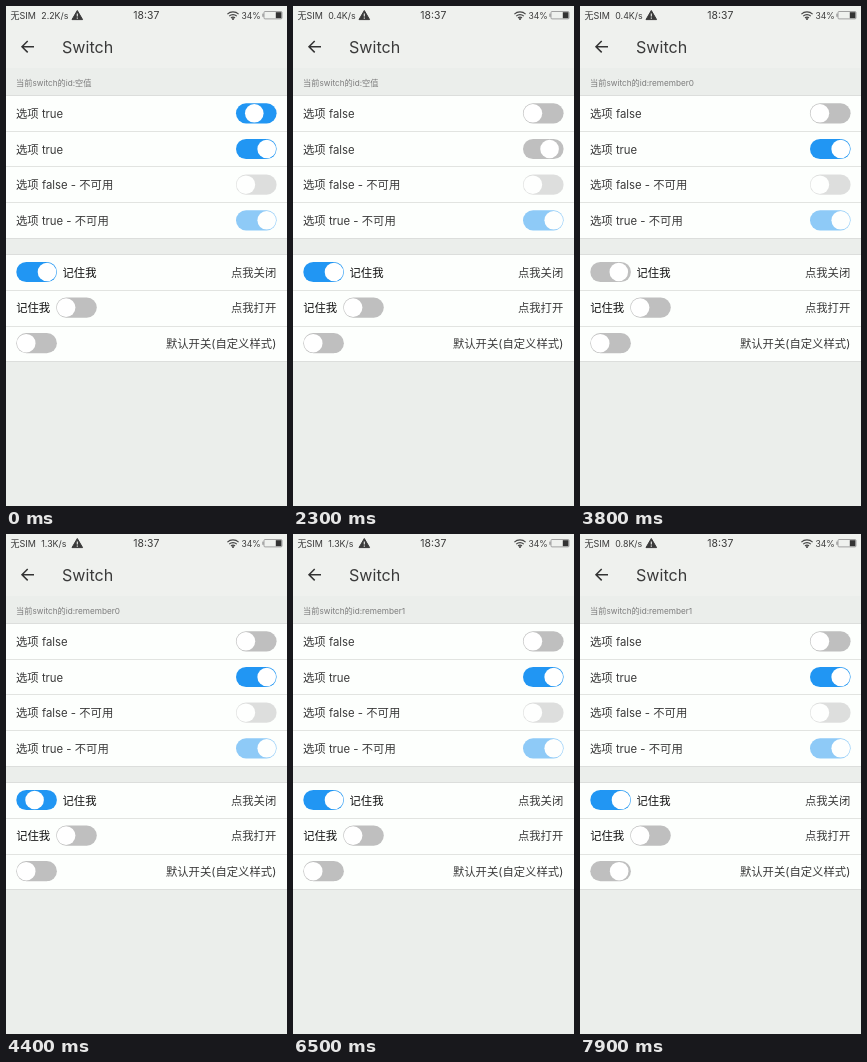
These frames come from a looping animation (281x500 px, 8000 ms). An HTML page:

```html
<!DOCTYPE html>
<html lang="zh-CN">
<head>
<meta charset="utf-8">
<title>Switch</title>
<style>
  html, body { margin: 0; width: 100%; height: 100%; overflow: hidden; background: #ebeeeb; }
  svg { display: block; width: 100vw; height: 100vh; }
  text { font-family: Inter, "Noto Sans CJK SC", "Noto Sans CJK", sans-serif; font-size: 11.35px; fill: #3a3a3a; }
  .end { text-anchor: end; }
  .dark { fill: #111; }
</style>
</head>
<body>
<svg viewBox="0 0 281 500" id="stage">
  <rect width="281" height="500" fill="#ebeeeb"/>
  <rect width="281" height="62" fill="#eff1ee"/>

  <!-- status bar -->
  <text x="4.6" y="13" style="font-size:9px">无SIM</text>
  <text x="35.3" y="13" style="font-size:8.8px" id="speed"></text>
  <path d="M71.3 4.5 76.6 13.6H66Z" fill="#3a3a3a" stroke="#3a3a3a" stroke-linejoin="round"/>
  <path d="M71.3 7.4v3.1M71.3 11.6v1.2" stroke="#eff1ee" stroke-width="1.1"/>
  <text x="140.3" y="13.4" style="font-size:10.4px" text-anchor="middle">18:37</text>
  <g fill="none" stroke="#444" stroke-width="1.1">
    <path d="M221.4 8.2a8 8 0 0 1 11.2 0M223.2 10.2a5.4 5.4 0 0 1 7.6 0M225 12a2.8 2.8 0 0 1 4 0"/>
    <circle cx="227" cy="13" r=".5"/>
  </g>
  <text x="235.5" y="12.8" style="font-size:8.6px">34%</text>
  <rect x="258" y="5.5" width="18" height="7.4" rx="1" fill="none" stroke="#999" stroke-width=".9"/>
  <rect x="256.3" y="7.6" width="1.4" height="3.2" fill="#999"/>
  <rect x="269.8" y="6.2" width="5.6" height="6" fill="#333"/>

  <!-- header -->
  <path d="M28 40.7H16M21.7 35 16 40.7l5.7 5.7" fill="none" stroke="#333" stroke-width="1.5"/>
  <text x="56" y="47.2" style="font-size:16.1px">Switch</text>
  <text x="10" y="79.5" style="font-size:8.2px;fill:#7c7c7c" id="current"></text>

  <!-- lists -->
  <path d="M0 90H281V232H0ZM0 249H281V355H0Z" fill="#fdfffd"/>
  <path d="M0 89.5H281M0 232.5H281M0 248.5H281M0 355.5H281" stroke="#dcdedc"/>
  <path d="M0 125.5H281M0 160.5H281M0 196.5H281M0 284.5H281M0 320.5H281" stroke="#e2e4e1"/>
  <text x="10" y="111.8" id="label1"></text>
  <text x="10" y="147.5" id="label2"></text>
  <text x="10" y="183.2">选项 false - 不可用</text>
  <text x="10" y="218.9">选项 true - 不可用</text>
  <text x="56.5" y="270.5" class="dark">记住我</text>
  <text x="10.2" y="306" class="dark">记住我</text>
  <text x="270.3" y="270.5" class="end">点我关闭</text>
  <text x="270.3" y="306" class="end">点我打开</text>
  <text x="270.3" y="341.6" class="end">默认开关(自定义样式)</text>
</svg>
<script>
const LOOP = 8000, STEP = 100, SLIDE = 220, TRAVEL = 20.8;
const BLUE = '#2196f3', GRAY = '#bfbfbf';
const byId = id => document.getElementById(id);

// x, centre y, initially on, toggle times in ms
const switches = [
  { x: 230, y: 107.3, on: false, at: [-50, 1101], label: 'label1' },
  { x: 230, y: 143, on: true, at: [2277, 3095], label: 'label2' },
  { x: 230, y: 178.7, on: false, at: [], disabled: true },
  { x: 230, y: 214.3, on: true, at: [], disabled: true },
  { x: 10.3, y: 266, on: true, at: [3788, 4350] },
  { x: 50.2, y: 301.6, on: false, at: [5495, 6190] },
  { x: 10.3, y: 337.2, on: false, at: [6945, 7890] }
];
const speeds = [[0, '2.2K/s'], [1200, '0.4K/s'], [3900, '1.3K/s'], [7000, '0.8K/s']];
const ids = [[0, '空值'], [3800, 'remember0'], [5500, 'remember1']];

function add(parent, tag, attrs) {
  const el = document.createElementNS('http://www.w3.org/2000/svg', tag);
  for (const k in attrs) el.setAttribute(k, attrs[k]);
  return parent.appendChild(el);
}

function setText(id, value) {
  const el = byId(id);
  if (el.textContent !== value) el.textContent = value;
}

const valueAt = (steps, t) => steps.filter(s => s[0] <= t).pop()[1];

for (const s of switches) {
  const g = add(byId('stage'), 'g', { opacity: s.disabled ? 0.5 : 1 });
  s.track = add(g, 'rect', { x: s.x, y: s.y - 10.1, width: 40.6, height: 20.2, rx: 10.1 });
  s.knob = add(g, 'circle', { cx: s.x + 10, cy: s.y, r: 9.3, fill: '#fff' });
}

function drawSwitch(s, t) {
  const past = s.at.filter(a => a <= t);
  const on = s.on !== (past.length % 2 === 1);
  const p = past.length ? Math.min(1, (t - past[past.length - 1]) / SLIDE) : 1;
  const eased = 1 - (1 - p) ** 2;
  s.track.setAttribute('fill', on ? BLUE : GRAY);
  s.knob.setAttribute('cx', s.x + 9.9 + TRAVEL * (on ? eased : 1 - eased));
  if (s.label) setText(s.label, '选项 ' + on);
}

function draw(ms) {
  const t = Math.floor((ms % LOOP) / STEP) * STEP;
  switches.forEach(s => drawSwitch(s, t));
  setText('speed', valueAt(speeds, t));
  setText('current', '当前switch的id:' + valueAt(ids, t));
}

const start = performance.now();
function tick() {
  draw(performance.now() - start);
  requestAnimationFrame(tick);
}
tick();
</script>
</body>
</html>
```
